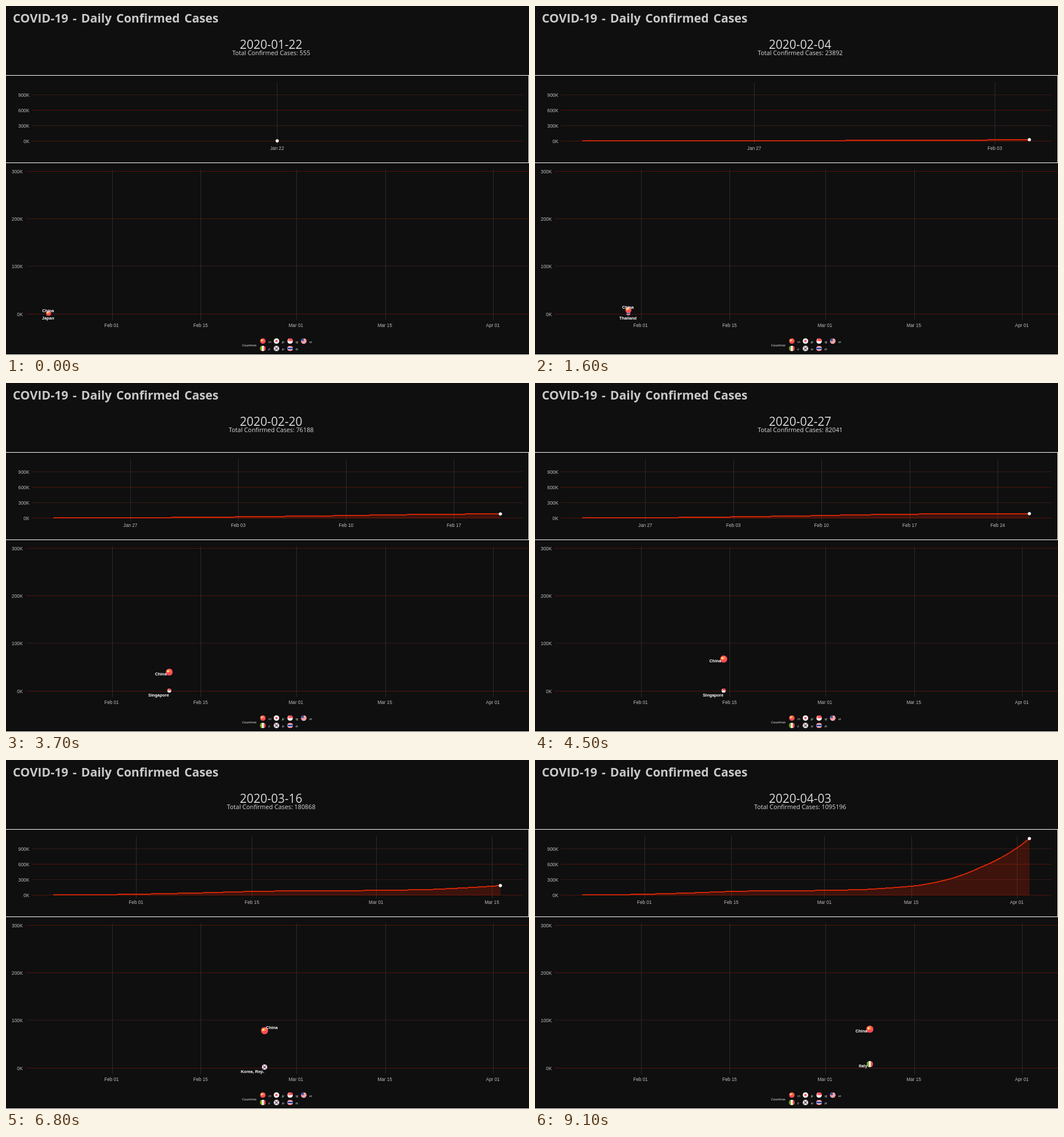
These frames come from a looping animation (917 px wide and 611 px high, 10 s). An HTML page:

```html
<!DOCTYPE html>
<html lang="en">
<head>
<meta charset="utf-8">
<title>Daily Confirmed Cases</title>
<style>
  html, body { margin: 0; width: 100%; height: 100%; overflow: hidden; background: #0f0f0f; }
  svg { display: block; }
  text { font-family: "Liberation Sans", Arial, sans-serif; fill: #bebebe; }
  .hand { font-family: "Open Sans", "Noto Sans", sans-serif; fill: #d9d9d9; }
  .title { font-weight: 700; fill: #c8c8c8; word-spacing: 2.4px; }
  .name { font-weight: 700; fill: #fff; }
  .key { font-style: italic; fill: #f4f4f4; }
  .crisp { shape-rendering: crispEdges; }
</style>
</head>
<body>
<svg width="917" height="611" viewBox="0 0 917 611">
  <defs><clipPath id="disc"><circle r="1"/></clipPath></defs>
  <g id="fixed"></g>
  <g id="moving"></g>
</svg>
<script>
const START = Date.UTC(2020, 0, 22), LAST_DAY = 72, LAST_STEP = 91;
const RED = '#ff4b55', WHITE = '#f5f5f5', BLUE = '#41479b', YELLOW = '#ffe15a';
const GRID_RED = '#50150a', GRID_DIM = '#351c17', GRID_GREY = '#2b2b2b';

// Exponential growth between a few [day, cases] points
const growth = points => day => {
  const i = Math.max(1, points.findIndex(p => p[0] >= day));
  const [d0, v0] = points[i - 1], [d1, v1] = points[i];
  return v0 * (v1 / v0) ** ((day - d0) / (d1 - d0));
};
const total = growth([[0, 555], [7, 6166], [13, 23892], [22, 60193], [27, 74594], [36, 82041],
  [45, 101088], [54, 180868], [59, 303812], [64, 528879], [72, 1095196]]);
const leader = growth([[0, 547], [7, 6070], [14, 27440], [21, 44700], [23, 66358], [34, 77754], [46, 80823]]);
const runnerUp = growth([[0, 2], [6, 14], [14, 28], [28, 84], [34, 977], [41, 5186], [46, 7375]]);

const runnerUpCode = [[0, 'jp'], [1, 'th'], [10, 'jp'], [13, 'th'], [14, 'sg'], [29, 'kr'], [46, 'it']];
const names = { cn: 'China', jp: 'Japan', th: 'Thailand', sg: 'Singapore', kr: 'Korea, Rep.', it: 'Italy' };

// Label placement around a flag, and which one the two flags use from a given step
const sides = { over: [0, -5.5], under: [0, 7], left: [-4.5, 2.5], upRight: [2.5, -6.2], downLeft: [-.5, 7] };
const labelSides = [
  [0, 'over', 'under'], [23, 'left', 'upRight'], [37, 'left', 'downLeft'],
  [57, 'upRight', 'downLeft'], [91, 'left', 'left']];

const latest = (list, at) => list.filter(e => e[0] <= at).pop();
const dateOf = day => new Date(START + day * 864e5);
const shortDate = day => dateOf(day).toLocaleDateString('en-US', { month: 'short', day: '2-digit', timeZone: 'UTC' });
const allDays = [...Array(LAST_DAY + 1).keys()];
const halfMonths = allDays.filter(d => [1, 15].includes(dateOf(d).getUTCDate()));

const text = (x, y, s, size, anchor = 'middle', cls = '') =>
  `<text x="${x}" y="${y + size * .36}" font-size="${size}" text-anchor="${anchor}" class="${cls}">${s}</text>`;
const rect = (x, y, w, h, fill) => `<rect x="${x}" y="${y}" width="${w}" height="${h}" fill="${fill}"/>`;
const dot = (x, y, r, fill) => `<circle cx="${x}" cy="${y}" r="${r}" fill="${fill}"/>`;
const hline = (x, y, w, fill) => rect(x, Math.floor(y), w, 1, fill);
const vline = (x, y, h, fill) => rect(Math.floor(x), y, 1, h, fill);

const base = fill => rect(-1, -1, 2, 2, fill);
const flagArt = {
  cn: base(RED) + dot(-.35, -.25, .36, YELLOW) + dot(.15, -.6, .13, YELLOW) + dot(.25, -.15, .13, YELLOW),
  jp: base(WHITE) + dot(0, 0, .42, RED),
  sg: base(WHITE) + rect(-1, -1, 2, 1, RED) + dot(-.45, -.42, .25, WHITE) + dot(-.33, -.42, .22, RED),
  us: base(WHITE) + [-1, -.4, .2, .8].map(y => rect(-1, y, 2, .3, RED)).join('') + rect(-1, -1, 1, 1, BLUE),
  it: base(WHITE) + rect(-1, -1, .67, 2, '#73af00') + rect(.33, -1, .67, 2, RED),
  kr: base(WHITE) + dot(0, 0, .4, BLUE) + `<path d="M-.4 0A.4 .4 0 0 1 .4 0Z" fill="${RED}"/>` +
    [45, 135, 225, 315].map(a => `<g transform="rotate(${a})">${rect(.58, -.25, .18, .5, '#333')}</g>`).join(''),
  th: base(RED) + rect(-1, -.62, 2, 1.24, WHITE) + rect(-1, -.34, 2, .68, BLUE)
};
const flag = (code, x, y, r) =>
  `<g transform="translate(${x} ${y}) scale(${r})"><g clip-path="url(#disc)">${flagArt[code]}</g></g>`;

const topY = cases => 236.15 - cases * 9e-5;
const lowX = day => 74.6 + day * 11.14;
const lowY = cases => 539 - cases * 8.32e-4;

function drawFixed() {
  let out = text(12, 21.3, 'COVID-19 - Daily Confirmed Cases', 21.2, 'start', 'hand title');
  [0, 300, 600, 900].forEach((k, i) => {
    const y = topY(k * 1000);
    out += hline(45, y, 861, i % 2 ? GRID_DIM : GRID_RED) + text(41, y + .4, k + 'K', 8.3, 'end');
  });
  [0, 100, 200, 300].forEach((k, i) => {
    const y = lowY(k * 1000);
    out += hline(35, y, 882, i === 1 ? GRID_DIM : GRID_RED) + text(29.5, y + .7, k + 'K', 8.3, 'end');
  });
  for (const day of halfMonths) {
    const x = lowX(day);
    out += vline(x, 286, 264, GRID_GREY) + text(x - .8, 559, shortDate(day), 8.2);
  }
  out += [121, 274, 610].map(y => hline(0, y, 917, '#fff')).join('') + vline(916, 121, 154, '#fff');
  out += text(414, 594, 'Countries', 6, 'start', 'hand key');
  [['cn', 'jp', 'sg', 'us'], ['it', 'kr', 'th']].forEach((row, j) => row.forEach((code, i) => {
    const x = 450.3 + i * 23.9, y = 586.6 + j * 13;
    out += flag(code, x, y, 4.9) + text(x + 9.7, y + 1.4, code, 4.8, 'start', 'hand key');
  }));
  fixed.innerHTML = out;
}

// Every day lands on a whole step; the steps between are interpolated
const stepOf = day => Math.round(day * LAST_STEP / LAST_DAY);
function dayAt(step) {
  const day = allDays.filter(d => stepOf(d) <= step).pop();
  return day + (step - stepOf(day)) / (stepOf(day + 1) - stepOf(day));
}

function ticksFor(days) {
  const ticks = days < 7 ? allDays
    : days < 13 ? allDays.filter(d => d % 2)
    : days < 48 ? allDays.filter(d => d % 7 === 5)
    : halfMonths;
  return ticks.filter(d => d <= days);
}

function drawTop(days) {
  const x = day => days ? 83.3 + 783.5 * day / days : 475.5;
  const today = Math.round(days);
  let out = text(464.7, 67.5, dateOf(today).toISOString().slice(0, 10), 21, 'middle', 'hand') +
    text(465, 82, 'Total Confirmed Cases: ' + Math.round(total(today)), 10.8, 'middle', 'hand');
  for (const t of ticksFor(days))
    out += vline(x(t), 133, 109, GRID_GREY) + text(x(t) - .3, 249.5, shortDate(t), 8.2);
  if (days) {
    const line = [...allDays.filter(d => d < days), days].map(d => `${x(d)},${topY(total(d))}`).join(' ');
    out += `<g class="crisp"><polygon points="${x(0)},236.5 ${line} ${x(days)},236.5" fill="#dd2200" opacity=".22"/>` +
      `<polyline points="${line}" fill="none" stroke="#cc2506" stroke-width="2"/></g>`;
  }
  return out + dot(x(days), topY(total(days)), 2.8, '#fff');
}

function drawLow(step) {
  const day = Math.ceil(step / 2), x = lowX(day);
  const [, leaderSide, runnerSide] = latest(labelSides, step);
  const marks = [
    [latest(runnerUpCode, day)[1], runnerUp(day), sides[runnerSide]],
    ['cn', leader(day), sides[leaderSide]]];
  const flags = marks.map(([code, v]) => flag(code, x, lowY(v) - .5, 2.2 + .85 * Math.log10(v)));
  const labels = marks.map(([code, v, [dx, dy]]) =>
    text(x + (dx || -.8), lowY(v) + dy, names[code], 7.4, dx < 0 ? 'end' : dx > 0 ? 'start' : 'middle', 'name'));
  return flags.join('') + labels.join('');
}

const fixed = document.getElementById('fixed'), moving = document.getElementById('moving');
let shown = -1;
function tick() {
  const step = Math.min(LAST_STEP, Math.floor(performance.now() % 10000 / 100));
  if (step !== shown) {
    shown = step;
    moving.innerHTML = drawTop(dayAt(step)) + drawLow(step);
  }
  requestAnimationFrame(tick);
}
drawFixed();
tick();
</script>
</body>
</html>
```
